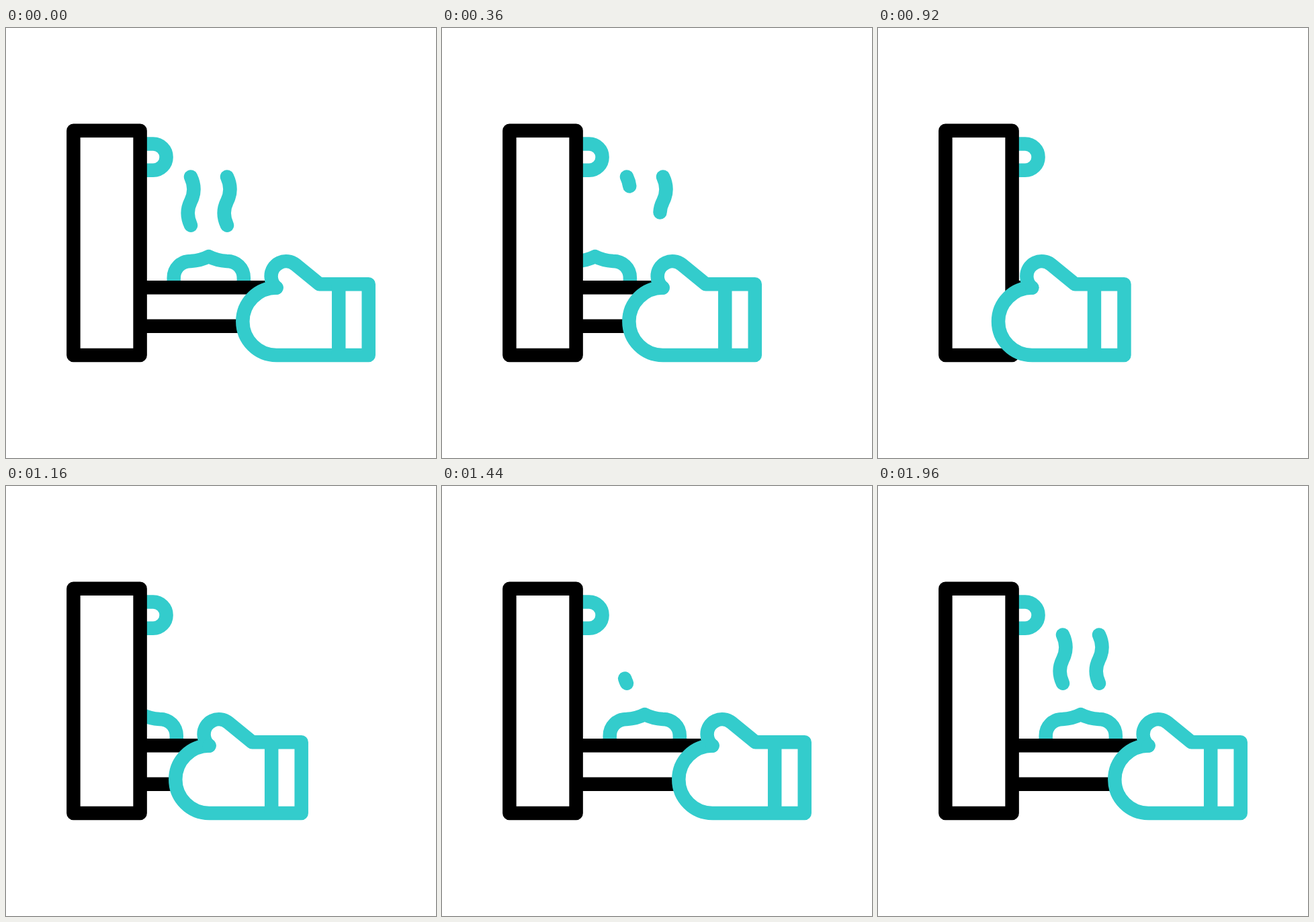
An HTML page that plays this animation: 640 px wide and 640 px high, repeating every 2.32 s.

```html
<!DOCTYPE html>
<html lang="en">
<head>
<meta charset="utf-8">
<title>Baking</title>
<style>
  html, body { margin: 0; width: 100%; height: 100%; overflow: hidden; background: #fff; }
  svg { display: block; width: 100%; height: 100%; }
  .line { fill: none; stroke-width: 20.5; stroke-linejoin: round; }
  .teal { stroke: #33cccc; }
  .black { stroke: #000; }
  .steam { stroke-linecap: round; }
</style>
</head>
<body>
<svg viewBox="0 0 640 640">
  <defs>
    <clipPath id="outside"><rect x="199" y="0" width="441" height="640"/></clipPath>
  </defs>

  <path class="line teal" d="M200 172.6H219a19.6 19.6 0 0 1 0 39.2H200"/>
  <path id="steamLeft" class="line teal steam" d="M275 221.5C281 234 281 246 275 258S269 281 275 293.7"/>
  <path id="steamRight" class="line teal steam" d="M329 221.5C335 234 335 246 329 258S323 281 329 293.7"/>

  <g clip-path="url(#outside)">
    <g id="tray">
      <path id="pie" class="line teal" d="M249.7 378V372C249.7 357 261 347 275 347C285 346.5 294 344 301.7 340C309.5 344 318.5 346.5 328.5 347C342.5 347 353.8 357 353.8 372V378"/>
      <path class="line black" d="M0 386.3H395M0 443.7H380"/>
    </g>
  </g>

  <rect class="line black" x="100.4" y="152.7" width="99.2" height="334.2"/>

  <g id="mitten">
    <path class="line teal" style="fill:#fff" d="M402.5 386.6A50.2 50.2 0 0 0 402.5 487H539.7V381.3H466.5L431 352.2A22.3 22.3 0 0 0 394.6 370C394.6 376 397 382 402.5 386.6Z"/>
    <path class="line teal" d="M495.2 381.3V487"/>
    <circle cx="402.5" cy="386.6" r="10.25" fill="#33cccc"/>
  </g>
</svg>
<script>
const LOOP = 2320, STEP = 40, TRAVEL = 174.5;
const [steamLeft, steamRight, tray, pie, mitten] =
  ["steamLeft", "steamRight", "tray", "pie", "mitten"].map(id => document.getElementById(id));

const progress = (t, start, length) => Math.min(1, Math.max(0, (t - start) / length));
const smooth = p => p * p * (3 - 2 * p);

// Cubic Bezier ease with flat ends, solved by bisection.
function slide(p, x1 = 0.5, x2 = 0.61) {
  let low = 0, high = 1;
  for (let i = 0; i < 24; i++) {
    const u = (low + high) / 2, v = 1 - u;
    const x = 3 * v * v * u * x1 + 3 * v * u * u * x2 + u ** 3;
    if (x < p) low = u; else high = u;
  }
  return p <= 0 ? 0 : p >= 1 ? 1 : smooth(low);
}

// Shows the part of a wisp between two fractions of its length.
function trim(path, from, to) {
  const total = path.getTotalLength(), shown = (to - from) * total;
  path.style.display = shown < 0.01 ? "none" : "";
  path.setAttribute("stroke-dasharray", `${shown} ${total * 2}`);
  path.setAttribute("stroke-dashoffset", -from * total);
}

function wisp(path, t, leave, arrive) {
  if (t < 800) trim(path, 0, 1 - smooth(progress(t, leave, 400)));
  else trim(path, 1 - smooth(progress(t, arrive, 400)), 1);
}

function draw(t) {
  const inside = slide(progress(t, 82, 558)) - slide(progress(t, 880, 560));
  const shift = `translate(${-TRAVEL * inside} 0)`;
  tray.setAttribute("transform", shift);
  mitten.setAttribute("transform", shift);

  const squash = Math.sin(Math.PI * progress(t, 1440, 480));
  pie.setAttribute("transform",
    `translate(301.7 376) scale(${1 + 0.023 * squash} ${1 - 0.042 * squash}) translate(-301.7 -376)`);

  wisp(steamLeft, t, 73, 1360);
  wisp(steamRight, t, 224, 1460);
}

function tick(now) {
  draw(Math.floor((now % LOOP) / STEP) * STEP);
  requestAnimationFrame(tick);
}
draw(0);
requestAnimationFrame(tick);
</script>
</body>
</html>
```
